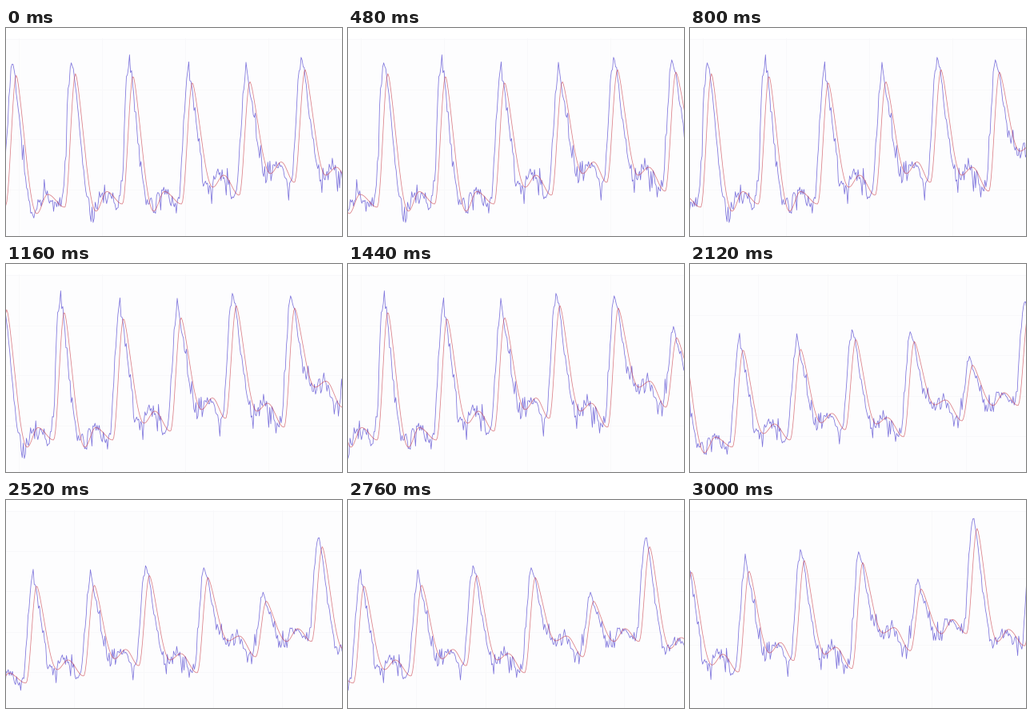
These frames come from a looping animation (420 by 260 pixels, 3.04 s). A matplotlib script:

```python
import numpy as np
import matplotlib.pyplot as plt
from matplotlib.animation import FuncAnimation
from matplotlib.patches import Rectangle

W, H, DPI = 420, 260, 100
FRAMES, INTERVAL = 76, 40
LEFT, SPAN = -89, 520        # plot area, partly outside the stage
TOP, BOTTOM = 13, 264
LAG = 4.8                    # delay of the filtered signal
RISE, FALL, REBOUND = 13.5, 25.5, 39

# each beat: x of the peak, then y of the peak, of the foot before it
# and of the dip after it
BEATS = [
    (13, 59, 222, 232), (87, 57, 224, 229), (159, 60, 220, 229),
    (233, 68, 220, 199), (305, 67, 209, 182), (374, 52, 193, 184),
    (447, 55, 204, 154), (520, 92, 179, 155), (590, 7, 155, 166),
    (663, 20, 172, 172), (735, 60, 180, 180),
]


def blend(x, x0, x1, y0, y1, power=2):
    """Sine-eased step from y0 to y1, nan outside x0..x1."""
    u = (x - x0) / (x1 - x0)
    k = np.sin(np.clip(u, 0, 1) * np.pi / 2) ** power
    return np.where((u >= 0) & (u < 1), y0 + (y1 - y0) * k, np.nan)


def pulse_wave(x, sharpen=0.0):
    y = np.full_like(x, BEATS[0][2])
    for (p, top, foot, dip), (q, _, end, _) in zip(BEATS, BEATS[1:]):
        top -= sharpen * (foot - top)
        bump = (dip + end) / 2 - 20
        parts = [
            blend(x, p - RISE, p, foot, top),
            blend(x, p, p + FALL, top, dip, 1.4),
            blend(x, p + FALL, p + REBOUND, dip, bump),
            blend(x, p + REBOUND, q - RISE, bump, end),
        ]
        for part in parts:
            y = np.where(np.isnan(part), y, part)
    return y


def raw_signal(x):
    rng = np.random.default_rng(4)
    noise = np.clip(6 * rng.standard_t(5, x.size), -22, 24)
    y = pulse_wave(x + LAG, 0.09)
    return y + noise * np.interp(y, [30, 150], [0.5, 1])


xs = np.arange(-12, 672, 1.3)
raw = raw_signal(xs)
filtered = pulse_wave(xs)


def scroll(frame):
    return np.interp(frame, [0, 12, 29, 43, 53, 63, 75],
                     [0, 37, 86, 132, 166.5, 194.5, 231])


def axis_state(frame):
    """Number of divisions and vertical scale of the auto-ranging axis."""
    if frame < 48:
        return 4, 1.0
    if frame < 73:
        return 5, 4 / 5
    return 3, 4 / 4.5


fig = plt.figure(figsize=(W / DPI, H / DPI), dpi=DPI, facecolor="white")
ax = fig.add_axes([0, 0, 1, 1])
ax.set_xlim(0, W)
ax.set_ylim(H, 0)
ax.axis("off")
ax.add_patch(Rectangle((0, TOP), W, H - TOP, fc="#fdfdfe", ec="none"))

px = 72 / DPI
grid, = ax.plot([], [], color="#f8f8fa", lw=px)
blue, = ax.plot([], [], color="#3020c8", lw=0.8 * px, alpha=0.62)
red, = ax.plot([], [], color="#c83440", lw=0.8 * px, alpha=0.62)


def grid_path(n):
    gx, gy = [], []
    for k in range(n + 2):
        x = round(LEFT + SPAN * k / (n + 1)) + 0.5
        gx += [x, x, np.nan]
        gy += [TOP, H, np.nan]
    for k in range(n):
        y = round(TOP + (BOTTOM - TOP) * k / n) + 0.5
        gx += [0, W, np.nan]
        gy += [y, y, np.nan]
    return gx, gy


def draw(frame):
    n, scale = axis_state(frame)
    x = xs - scroll(frame)
    grid.set_data(*grid_path(n))
    blue.set_data(x, BOTTOM - (BOTTOM - raw) * scale)
    red.set_data(x, BOTTOM - (BOTTOM - filtered) * scale)
    return grid, blue, red


anim = FuncAnimation(fig, draw, frames=FRAMES, interval=INTERVAL,
                     repeat=True, repeat_delay=0)
plt.show()
```
